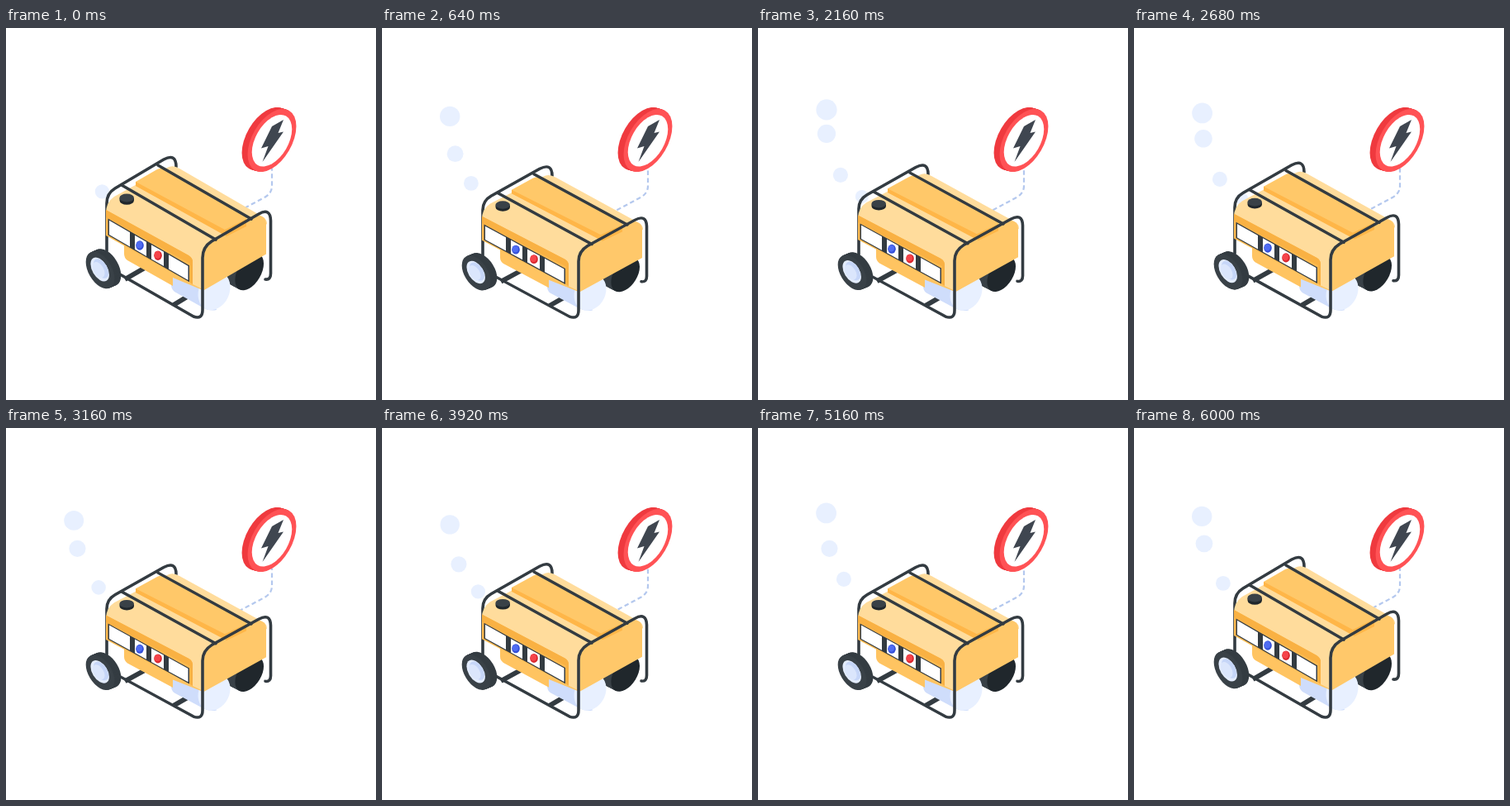
Animation of 448x450 px, one loop 6040 ms. Source, as an HTML page:

```html
<!DOCTYPE html>
<html lang="en">
<head>
<meta charset="utf-8">
<title>Generator</title>
<style>
  html, body { margin: 0; width: 100%; height: 100%; overflow: hidden; background: #fff; }
  svg { display: block; width: 448px; height: 450px; }
  .bar { fill: none; stroke: #333b41; stroke-width: 3.6; stroke-linecap: round; stroke-linejoin: round; }
  .foot { fill: none; stroke: #333b41; stroke-width: 6; }
</style>
</head>
<body>
<svg viewBox="0 0 448 450">
  <g id="smoke" fill="#e8f0ff"></g>
  <path id="cord" d="M281 222 L313 205 Q322 200 322 191 V170" fill="none" stroke="#b4c8ee" stroke-width="2.200" stroke-dasharray="5.500 3.500"/>

  <g id="sign"></g>
  <path d="M322 119 L336 111 L329.500 127 L336 125.500 L310.500 162 L317.500 143 L309 145.500 Z" fill="#3f4650"/>

  <g id="engine">
    <!-- underside -->
    <path class="foot" d="M144 304 L170 289 M203 335 L226 321"/>
    <path class="bar" d="M122 270 V212 Q122 200 132 194 L191 159 Q206 151 206 168"/>
    <g id="farWheel"></g>
    <path d="M200 298 L240 300 L255 341 Q246 343 238 338 L204 319 Q200 316 200 310 Z" fill="#cfddfb"/>
    <ellipse cx="252" cy="318" rx="18.500" ry="24" transform="rotate(24 252 318)" fill="#e8f0ff"/>

    <!-- housing -->
    <path d="M143 258 L232 300 L238 317 L202 302 V312 L147 281 Q143 278 143 273 Z" fill="#ffc461"/>
    <path d="M121 224 Q121 211 131 204 L195 169 Q202 165 210 170 L312 229 Q316 232 316 237 L240 290 V317 L226 310 L121 250 Z" fill="#ffdc9c"/>
    <path d="M240 317 V276 Q240 265 250 259 L306 227 Q315 228 315 237 V273.500 Z" fill="#ffc86a"/>
    <path d="M121 220 L221 275 Q226 278 226 283 V310 L121 251 Z" fill="#ffbb50"/>
    <path d="M121 220 L221 275 Q226 278 226 283 V310 L223 308 V285 L121 229 Z" fill="#f9b143"/>

    <!-- raised cover -->
    <path d="M157 186 L183 171 Q189 168 195 171 L291 228 V240 L267 251 L157 191 Z" fill="#ffc869"/>
    <path d="M157 186 L265 244 L291 231 V240 L267 252 L157 191 Z" fill="#ffb648"/>

    <path d="M137.500 206 V208.500 A8.700 5.200 0 0 0 155 208.500 V206 Z" fill="#20272c"/>
    <ellipse cx="146.200" cy="205.500" rx="8.800" ry="5" fill="#394147"/>
    <g id="panel"></g>

    <!-- tube frame -->
    <path class="bar" d="M140 190 L254 256 M184 166 L297 231"/>
    <path class="bar" d="M314 304 Q320.500 305 320.500 297 V233 Q320 217 306 225 L249 258 Q238 265 238 278 V341 Q238 353 227 349 L138 298"/>
    <g id="nearWheel"></g>
  </g>
</svg>
<script>
const LOOP = 6040;
const $ = id => document.getElementById(id);

function add(parent, tag, attrs) {
  const el = document.createElementNS('http://www.w3.org/2000/svg', tag);
  for (const k in attrs) el.setAttribute(k, attrs[k]);
  parent.appendChild(el);
  return el;
}

// Isometric circle; tilt is -1 for a plane rising right, 1 for one falling right
function disc(parent, x, y, r, tilt, fill) {
  return add(parent, 'circle', { r, fill, transform: `matrix(.866 ${tilt * .5} 0 1 ${x} ${y})` });
}

function thickDisc(parent, x, y, dx, dy, r, tilt, side, face) {
  for (let i = 8; i > 0; i--) disc(parent, x + dx * i / 8, y + dy * i / 8, r, tilt, side);
  disc(parent, x, y, r, tilt, face);
}

thickDisc($('sign'), 322, 136, -7, -2, 34, -1, '#ef3a3f', '#ff5255');
disc($('sign'), 322, 136.3, 28, -1, '#fff');

thickDisc($('farWheel'), 294.7, 295, -11, -6, 20, -1, '#394147', '#20272c');

thickDisc($('nearWheel'), 114, 293, 8, -3.5, 20, 1, '#343c42', '#394147');
disc($('nearWheel'), 113.7, 292, 13, 1, '#e3ecfd');
disc($('nearWheel'), 115, 291, 10.5, 1, '#c6d6f8');
disc($('nearWheel'), 112.2, 292.5, 8.5, 1, '#dbe6fc');

function slab(x1, x2, top, height, fill) {
  const y = x => top + .577 * (x - 124);
  add($('panel'), 'path', {
    fill, d: `M${x1} ${y(x1)} L${x2} ${y(x2)} v${height} L${x1} ${y(x1) + height} Z`
  });
}
slab(123.5, 222, 230.8, 20, '#333b41');
for (const [a, b] of [[125, 150], [156, 170], [176, 191], [197, 220.5]]) slab(a, b, 232.2, 17.2, '#fff');
for (const [x, y, dark, light] of [[162, 263, '#3450d8', '#4f6cf2'], [184, 275.2, '#d9272e', '#f5444a']]) {
  add($('panel'), 'ellipse', { cx: x, cy: y, rx: 4.8, ry: 5.8, fill: dark });
  add($('panel'), 'ellipse', { cx: x - .6, cy: y - .8, rx: 3.6, ry: 4.3, fill: light });
}

// Puff path: age in ms, x, y, radius
const PUFF = [
  [0, 131, 207, 7.5], [40, 126, 204, 8], [120, 116.5, 198, 8.6], [200, 108, 188, 8.9],
  [280, 100, 178, 9.1], [360, 93, 165, 9.6], [480, 86.5, 146, 10.1], [520, 85, 140, 10.4],
  [600, 83, 128, 11.1], [680, 82.2, 117, 11.7], [760, 82.2, 107, 12.2], [840, 83, 99, 12.6],
  [880, 83, 96.5, 12.7]
];
const PUFF_LIFE = 880, PUFF_CYCLE = 560, PUFF_BIRTHS = [-120, 200];

function puffAt(age) {
  const i = Math.max(1, PUFF.findIndex(p => p[0] >= age));
  const a = PUFF[i - 1], b = PUFF[i], k = (age - a[0]) / (b[0] - a[0]);
  return a.map((v, n) => v + (b[n] - v) * k);
}

const puffs = Array.from({ length: 4 }, () => add($('smoke'), 'circle', {}));

function drawSmoke(t) {
  const live = [];
  for (const birth of PUFF_BIRTHS) {
    for (let start = birth; start <= t; start += PUFF_CYCLE) {
      if (t - start < PUFF_LIFE) live.push(puffAt(t - start));
    }
  }
  puffs.forEach((el, i) => {
    const [, x, y, r] = live[i] || [0, 0, 0, 0];
    el.setAttribute('cx', x);
    el.setAttribute('cy', y);
    el.setAttribute('r', r);
  });
}

const GROUND = 351, SHAKE = 250, SQUASH = .061, DASH = 9;

function draw(t) {
  const s = 1 - SQUASH * (1 - Math.cos(2 * Math.PI * t / SHAKE)) / 2;
  $('engine').setAttribute('transform', `translate(0 ${GROUND * (1 - s)}) scale(1 ${s})`);
  $('cord').setAttribute('stroke-dashoffset', -DASH * 4 * t / LOOP);
  drawSmoke(t);
}

const begin = performance.now();
function tick() {
  draw((performance.now() - begin) % LOOP);
  requestAnimationFrame(tick);
}
tick();
</script>
</body>
</html>
```
